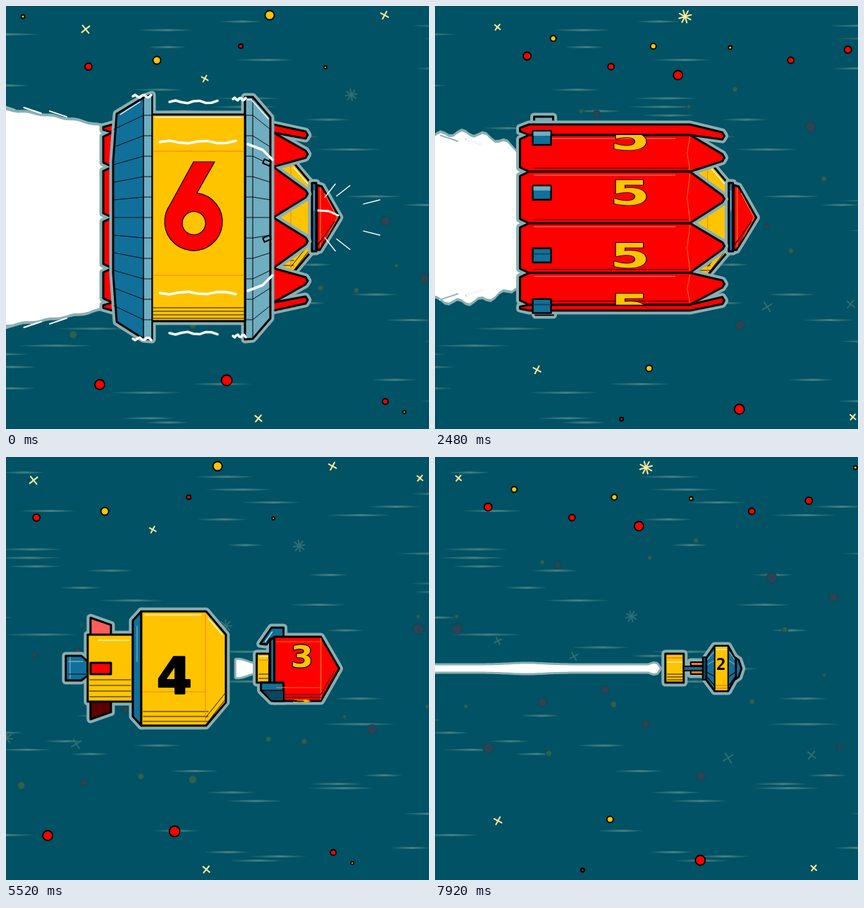
Animation, 600 px wide and 600 px high, one loop 8000 ms. Source, as an HTML page with a canvas:

```html
<!DOCTYPE html>
<html lang="en">
<head>
<meta charset="utf-8">
<title>Staged rocket</title>
<style>
html, body { margin: 0; width: 100%; height: 100%; overflow: hidden; background: #005264; }
canvas { display: block; width: 100vw; height: 100vh; }
</style>
</head>
<body>
<canvas id="c" width="600" height="600"></canvas>
<script>
const g = document.getElementById('c').getContext('2d');
const LOOP = 8000, STEP = 80, RAD = Math.PI / 180, TILE = 1200;
const RED = '#ff0000', YELLOW = '#ffc400', BLUE = '#10709a', PALE = '#6fadc0',
      NAVY = '#0a4560', ORANGE = '#ff7a18', INK = '#000', HALO = '#8aafb3', WHITE = '#fff';
const SEP = [-350, 1750, 3200, 5250, 6950];   // separation times

const clamp = (v, a = 0, b = 1) => Math.min(b, Math.max(a, v));
const ease = v => (1 - Math.cos(Math.PI * clamp(v))) / 2;
const mix = (a, b, p) => a + (b - a) * p;
const wrap = x => ((x + 300) % TILE + TILE) % TILE - 300;
const range = (n, fn) => Array.from({ length: n }, (_, i) => fn(i));
const at = (x, y, fn, rot = 0) => { g.save(); g.translate(x, y); g.rotate(rot); fn(); g.restore(); };
function seeded(s) {
  return () => (s = (s * 16807) % 2147483647) / 2147483647;
}

function trace(p) {
  g.beginPath();
  for (let i = 0; i < p.length; i += 2) g.lineTo(p[i], p[i + 1]);
  g.closePath();
}
function poly(p, fill, width = 3) {
  trace(p);
  g.fillStyle = fill; g.fill();
  if (width) { g.strokeStyle = INK; g.lineWidth = width; g.stroke(); }
}
const box = (x0, y0, x1, y1) => [x0, y0, x1, y0, x1, y1, x0, y1];
function halo(p, width = 11) {
  trace(p); g.strokeStyle = HALO; g.lineWidth = width; g.stroke();
}
function group(parts) {
  for (const [p] of parts) halo(p);
  for (const part of parts) poly(...part);
}
function lines(color, width, ...segs) {
  g.strokeStyle = color; g.lineWidth = width; g.beginPath();
  for (const s of segs) {
    g.moveTo(s[0], s[1]);
    for (let i = 2; i < s.length; i += 2) g.lineTo(s[i], s[i + 1]);
  }
  g.stroke();
}
const hatch = (x0, x1, y, gap, count) => lines(INK, 0.9, ...range(count, i => [x0, y + i * gap, x1, y + i * gap]));

function glyph(ch, size, fill, scaleY = 1) {
  g.scale(1, scaleY);
  g.font = `bold ${size}px "DejaVu Sans", sans-serif`;
  g.textAlign = 'center';
  g.lineWidth = 2.5; g.strokeStyle = INK; g.strokeText(ch, 0, size * 0.365);
  g.fillStyle = fill; g.fillText(ch, 0, size * 0.365);
}
// Digit on a cylinder of radius R at roll angle a
function rolled(ch, x, R, a, size, fill) {
  if (Math.cos(a) > 0.05) at(x, 300 + R * Math.sin(a), () => glyph(ch, size, fill, Math.cos(a)));
}

// Sky: bright bodies are placed, dim ones and speed lines are scattered
const planets = {
  [YELLOW]: [[374,13,7], [214,77,6], [453,87,2.5], [24,15,3], [565,576,2.5], [740,46,4.5], [882,57,4.5], [876,514,5], [991,59,3]],
  [RED]: [[117,86,5.5], [333,57,3.5], [133,537,7.5], [313,531,8], [538,561,4.5], [703,71,6], [822,86,5], [917,98,7],
    [837,586,3], [1077,77,5], [1158,62,5.5], [1004,572,7.5]]
};
const sparks = [[113,33,7], [537,13,6], [282,103,5], [358,585,6], [661,30,5], [927,15,9], [717,516,6], [1165,583,5]];
const rnd = seeded(4271);
const scatter = (n, minR, maxR) => range(n, i => [(i + rnd()) * TILE / n, 115 + rnd() * 370, mix(minR, maxR, rnd())]);
const greys = scatter(20, 3, 8), greens = scatter(20, 3, 7), dimSparks = scatter(10, 5, 9);
const streaks = range(96, i => [rnd() * TILE, 16 + i * 6.05, 50 + rnd() * 55]);

function sky(n) {
  for (const [x0, y, w] of streaks) {
    const x = wrap(x0 - 39.25 * n), f = g.createLinearGradient(x - w / 2, 0, x + w / 2, 0);
    f.addColorStop(0, 'rgba(150,185,175,.08)');
    f.addColorStop(0.55, 'rgba(165,190,170,.42)');
    f.addColorStop(1, 'rgba(150,185,175,.08)');
    g.fillStyle = f; g.beginPath(); g.ellipse(x, y, w / 2, 1.5, 0, 0, 7); g.fill();
  }
  const drift = x => wrap(x - n * TILE / 65);
  const dots = (list, fill, edge) => list.forEach(([x, y, r]) => {
    g.beginPath(); g.arc(drift(x), y, r - 0.5, 0, 7);
    g.fillStyle = fill; g.fill();
    g.strokeStyle = edge; g.lineWidth = 1.8; g.stroke();
  });
  const stars = (list, color) => list.forEach(([x, y, r]) => at(drift(x), y, () => {
    const arms = r > 8 ? 8 : 4;
    lines(color, 2, ...range(arms, i => {
      const a = i * 2 * Math.PI / arms;
      return [Math.cos(a), Math.sin(a), r * Math.cos(a), r * Math.sin(a)];
    }));
  }, 0.5 + x % 3 * 0.2));
  dots(greys, '#2b4455', '#184656');
  dots(greens, '#2a6250', '#11505a');
  stars(dimSparks, '#2d6f74');
  for (const color in planets) dots(planets[color], color, INK);
  stars(sparks, '#ffe99c');
}

function plume(t, n, dx) {
  const power = t < SEP[1] ? 1 : clamp((t - 2480) / 280, -1, 1);
  if (t >= SEP[2] || (t >= SEP[1] && t < 2240)) return;
  const right = 108 + dx, near = 85 + 38 * power, far = 113 + 40 * power, rough = 4 - 3 * power;
  const edge = (s, grow) => range(25, i => {
    const u = i / 24, jag = rough * Math.sin(i * 1.2 + n * 1.7 + s);
    const h = near + (far - near) * u ** 0.7 + (1 - power) * 14 * Math.sin(u * Math.PI) + jag;
    return [right + 12 - u * (right + 22), 300 + s * (h + grow)];
  });
  const shape = grow => [...edge(-1, grow), ...edge(1, grow).reverse()].flat();
  poly(shape(4), HALO, 0);
  poly(shape(0), WHITE, 0);
  for (const s of [-1, 1]) for (let i = 0; i < 5; i++) {
    const x = (i * 37 + n * 29) % 110, y = 300 + s * (far - x * (far - near) / right + 4 + i % 3 * 3);
    lines(i % 2 ? HALO : WHITE, 2, [x - 12, y + s * 4, x + 12, y - s * 4]);
  }
}

function jet(t, n, dx) {
  const four = t < SEP[3], start = four ? 3440 : SEP[3] + 240;
  if (t < start) return;
  const late = t > 7100, tip = (four ? 176 : late ? 318 : 325) + dx;
  const bell = (x, mid, w) => Math.exp(-(((x - mid) / w) ** 2));
  const half = x => {
    const d = tip - x;
    if (four) return 5 + 17 * bell(d, 14, 20) + Math.sin(x * 0.13 + n * 2) * 1.5;
    if (late) return d < 16 ? 7 * Math.sqrt(1 - ((d - 8) / 8) ** 2) : 4.5 + 2 * bell(x, 130, 35);
    return 4 + 8 * bell(d, 26, 18) + Math.sin(x * 0.04 + n) * 0.6;
  };
  const xs = range(Math.round(90 * clamp((t - start) / 320)), i => tip - i * 4);
  if (!xs.length) return;
  const p = [...xs.map(x => [x, 300 - half(x)]), ...xs.reverse().map(x => [x, 300 + half(x)])].flat();
  halo(p, 6);
  poly(p, WHITE, 0);
  if (four) lines(HALO, 1.2, ...range(7, i => [tip - 4, 291 + i * 3, tip - 34, 282 + i * 6]));
}

function noseCone() {
  group([[[411,254, 418,256, 443,300, 415,346, 411,346], RED], [box(404,251,410,348), BLUE]]);
  lines(ORANGE, 1.2, [416,258, 416,342], [422,266, 440,300, 422,334]);
  lines(INK, 1.2, [416,344, 441,304], [413,338, 436,306]);
  lines(PALE, 1.5, [407,262, 407,290]);
}

function bodyFour(roll) {
  const fins = range(4, i => roll + (i - 1) * Math.PI / 2).filter(a => Math.cos(a) > -0.4).map(a => {
    const s = Math.sin(a), c = 8 * Math.abs(Math.cos(a)), i = 300 + 47 * s, o = 72 * s;
    return [[211,300 + o - c, 240,300 + o * 0.86 - c, 240,i + c, 211,i + c],
      s < -0.3 ? '#ff5c5c' : s > 0.97 ? '#5c0000' : RED];
  });
  const side = f => Math.abs(f[0][1] - 300) > 45;
  group([
    [[176,282, 198,282, 207,290, 207,310, 198,317, 176,317], BLUE],
    ...fins.filter(side),
    [box(207,252,271,347), YELLOW],
    [[271,232, 283,219, 283,381, 271,368], BLUE],
    [[283,219, 375,219, 403,252, 403,348, 375,381, 283,381], YELLOW]
  ]);
  for (const f of fins.filter(f => !side(f))) poly(...f);
  lines(PALE, 1.3, [180,290, 200,290], [182,284, 182,314], [277,240, 277,290]);
  hatch(210, 268, 316, 8, 4);
  hatch(286, 378, 361, 7, 3);
  lines(INK, 0.9, [180,308, 204,308], [375,379, 402,344], [374,370, 402,335]);
  lines(ORANGE, 1, [374,222, 374,377], [286,333, 374,333]);
  lines(WHITE, 1.2, [288,224, 368,224], [222,260, 266,260], [378,229, 398,252]);
  rolled('4', 330, 81, 0.11 + roll, 72, INK);
}

function hullThree(t) {
  group([
    [box(326,279,344,320), YELLOW],
    [[331,265, 347,242, 364,242, 364,256, 345,258, 340,266], BLUE],
    [[345,260, 351,255, 351,346, 345,341], BLUE],
    [[351,255, 417,255, 443,300, 417,346, 351,346], RED],
    [[332,320, 364,320, 364,346, 347,346, 332,331], BLUE]
  ]);
  poly([333,331, 364,331, 364,346, 347,346], NAVY, 1.5);
  lines(ORANGE, 1.2, [417,257, 417,344], [354,262, 415,262], [354,327, 415,327], [329,288, 343,288]);
  hatch(366, 417, 337, 4, 2);
  hatch(329, 342, 308, 6, 2);
  lines(INK, 0.9, [418,343, 440,304], [416,338, 436,304]);
  lines(WHITE, 1.2, [330,283, 342,283], [338,262, 348,248]);
  const a = 40 + (6400 - t) * 0.05;
  for (const d of [a, a - 106]) rolled('3', 390, 46, d * RAD, 46, YELLOW);
}

function capsule() {
  group([
    [box(326,279,352,320), YELLOW],
    [box(352,297,384,303), BLUE, 2],
    [box(362,291,381,296), ORANGE, 2],
    [box(362,303,381,308), ORANGE, 2],
    [[424,284, 430,288, 434,300, 430,312, 424,316], BLUE],
    [[384,285, 396,268, 415,268, 426,288, 426,312, 415,332, 396,332, 384,316], BLUE]
  ]);
  poly(box(379,284,384,316), NAVY, 2);
  for (const [s, color] of [[-1, PALE], [1, INK]])
    lines(color, 1.2, ...[6, 13].flatMap(d => [[386,300 + s * d, 395,300 + s * d * 1.8], [417,300 + s * d * 1.8, 424,300 + s * d]]));
  poly(box(396,268,415,332), YELLOW, 2);
  lines(ORANGE, 1.3, [398,324, 413,324], [398,328, 413,328], [329,285, 350,285]);
  lines(WHITE, 1.2, [329,291, 350,291], [398,273, 413,273]);
  hatch(329, 350, 308, 4, 3);
  g.font = 'bold 23px "DejaVu Sans Mono", monospace';
  g.textAlign = 'center'; g.fillStyle = INK; g.fillText('2', 405, 302);
}

// Side rockets around the core, tip at the local origin; p is how far they have peeled away
function boosters(degs, p, back) {
  const rockets = degs.map(deg => {
    const s = Math.sin(deg * RAD);
    const edge = d => mix(132 * Math.sin(clamp(deg + d, -90, 90) * RAD) - 118 * s, 2 * d, clamp(p));
    const a = edge(-16.5), b = edge(16.5), q = Math.min(6, (b - a) / 3), end = 30 * p - 290;
    return {
      s, a, b, deg, end,
      shape: [end + 13,a, -49,a, -3,-5, 0,0, -3,5, -49,b, end + 13,b, end,b - q, end,a + q],
      place: fn => at(398 - 158 * p, 300 + (118 + 140 * p) * s, fn, 40 * RAD * s * p)
    };
  });
  for (const r of rockets) r.place(() => halo(r.shape));
  for (const { s, a, b, deg, end, shape, place } of rockets) place(() => {
    poly(shape, back ? '#a60000' : RED);
    if (back || Math.abs(deg) > 70) return;
    lines(ORANGE, 1, [-49,a + 3, -53,(a + b) / 2, -49,b - 3]);
    lines('#ff8080', 1, [end + 20,a + 5, -70,a + 5]);
    lines(INK, 0.9, [end + 20,b - 5, -52,b - 5]);
    const y = 39 * s, x = end + 31;
    poly(box(x - 13, y - 10, x + 13, y + 10), BLUE, 2.5);
    if (s < 0) poly(box(x - 12, y - 9, x + 12, y - 3), PALE, 0);
    else lines(NAVY, 2, [x - 12,y - 2, x + 12,y - 2]);
    trace(shape); g.clip();
    at(-134, y, () => glyph('5', 82, YELLOW, 0.58));
  });
}

function sleeveSix() {
  group([
    [[127,153, 165,130, 177,126, 177,473, 165,472, 127,448, 122,380, 122,220], BLUE],
    [[309,129, 320,129, 345,158, 345,443, 320,472, 309,473], PALE],
    [box(177,154,309,447), YELLOW]
  ]);
  poly([165,130, 177,127, 177,473, 165,472], PALE, 1.5);
  lines(INK, 1, [320,131, 320,470]);
  for (let i = -5; i <= 5; i++) {
    const y = 300 + i * 29, rim = 300 + i * 25;
    lines(INK, 0.9, [123,rim, 165,y, 177,y], [309,y, 320,y, 345,rim]);
  }
  lines(ORANGE, 1, [179,206, 307,206], [179,382, 307,382]);
  lines(WHITE, 1.3, [182,158, 304,158], [312,133, 318,133, 342,160], [132,154, 160,136]);
  hatch(179, 307, 428, 5, 4);
  g.beginPath();
  g.moveTo(236,221); g.lineTo(266,221); g.lineTo(241,265);
  g.arc(236, 306, 41, -83 * RAD, 213 * RAD);
  g.closePath();
  g.moveTo(253,308); g.arc(236.5, 308, 16.5, 0, 7);
  g.fillStyle = RED; g.fill('evenodd');
  g.strokeStyle = INK; g.lineWidth = 1.2; g.stroke();
}

// White spray left over from the stage shed before the loop begins
function splash(t) {
  if (t > 400) return;
  g.globalAlpha = 1 - t / 480;
  at(-t * 0.5, 0, () => {
    for (const s of [-1, 1]) {
      const wave = (x0, x1, r) => range(9, i => [mix(x0, x1, i / 8), 300 + s * (r + 2 * Math.sin(i * 1.7))]).flat();
      lines(WHITE, 3.5, wave(218, 326, 107), wave(232, 300, 164), wave(322, 340, 168), wave(180, 206, 172),
        [343,300 + s * 104, 364,300 + s * 96, 378,300 + s * 82]);
      for (const a of [14, 38, 52].map(d => s * d * RAD)) {
        const r = 60 + 26 * Math.cos(a * 3), x = Math.cos(a), y = Math.sin(a);
        lines(WHITE, 1.4, [430 + x * r,300 + y * r, 430 + x * (r + 24),300 + y * (r + 24)]);
      }
      at(370, 276 + s * 54, () => poly(box(-5,-3,5,3), PALE, 2), -0.4 * s);
    }
    lines(WHITE, 3, [443,290, 458,291, 471,297]);
  });
  g.globalAlpha = 1;
}

function draw(t) {
  const n = t / STEP;
  g.fillStyle = '#005264'; g.fillRect(0, 0, 600, 600);
  g.lineJoin = g.lineCap = 'round';
  sky(n);

  // Each separation kicks the ship forward, then it settles back
  const u = t - SEP.filter(s => s <= t).pop();
  const dx = 30 * (u < 300 ? Math.sin(u / 600 * Math.PI) : 1 - ease((u - 350) / 690));
  const ship = fn => at(dx, 0, fn);
  plume(t, n, dx);
  jet(t, n, dx);

  const peel = t < SEP[2] ? 0 : ((t - SEP[2]) / 320) ** 1.5;
  if (peel && peel < 5) {
    boosters([-15, 25, 63], peel, true);
    lines(WHITE, 3, [70,330, 130,321, 200,310], [108,333, 205,314], [110,226, 148,234]);
  }

  if (t < SEP[3]) ship(() => { bodyFour(70 * RAD * (1 - ease((t - 3520) / 880))); noseCone(); });
  else if (t < SEP[4]) {
    ship(() => hullThree(t));
    at(-450 * ((t - SEP[3]) / 600) ** 2, 0, () => bodyFour(0));
  } else {
    ship(capsule);
    const q = (t - SEP[4]) / 500;
    if (q < 1.7) for (const s of [-1, 1]) at(390 - 260 * q * q, 300 + s * 70 * q, () => {
      g.translate(-390, -300);
      g.beginPath(); g.rect(310, s < 0 ? 200 : 300, 150, 100); g.clip();
      hullThree(t);
    }, s * q * 0.6);
  }

  if (peel < 5) {
    const turn = 3.5 * ease((t - SEP[1]) / 730), open = clamp(peel);
    const ring = range(peel ? 5 : 6, i => 33 * i - 82.5 + turn).sort((a, b) => Math.abs(b) - Math.abs(a));
    at(dx * (1 - open), 0, () => {
      if (!peel && t >= SEP[1]) group([[box(128,157,155,168), PALE], [box(130,430,155,438), NAVY]]);
      boosters(ring.map(d => d + open * (6.5 + 0.15 * d)), peel);
    });
  }

  if (t < SEP[1]) ship(sleeveSix);
  else at(-450 * ((t - SEP[1]) / 520) ** 2, 0, sleeveSix);
  splash(t);
}

const begin = performance.now();
function tick() {
  const t = (performance.now() - begin) % LOOP;
  draw(Math.floor(t / STEP) * STEP);
  requestAnimationFrame(tick);
}
tick();
</script>
</body>
</html>
```
